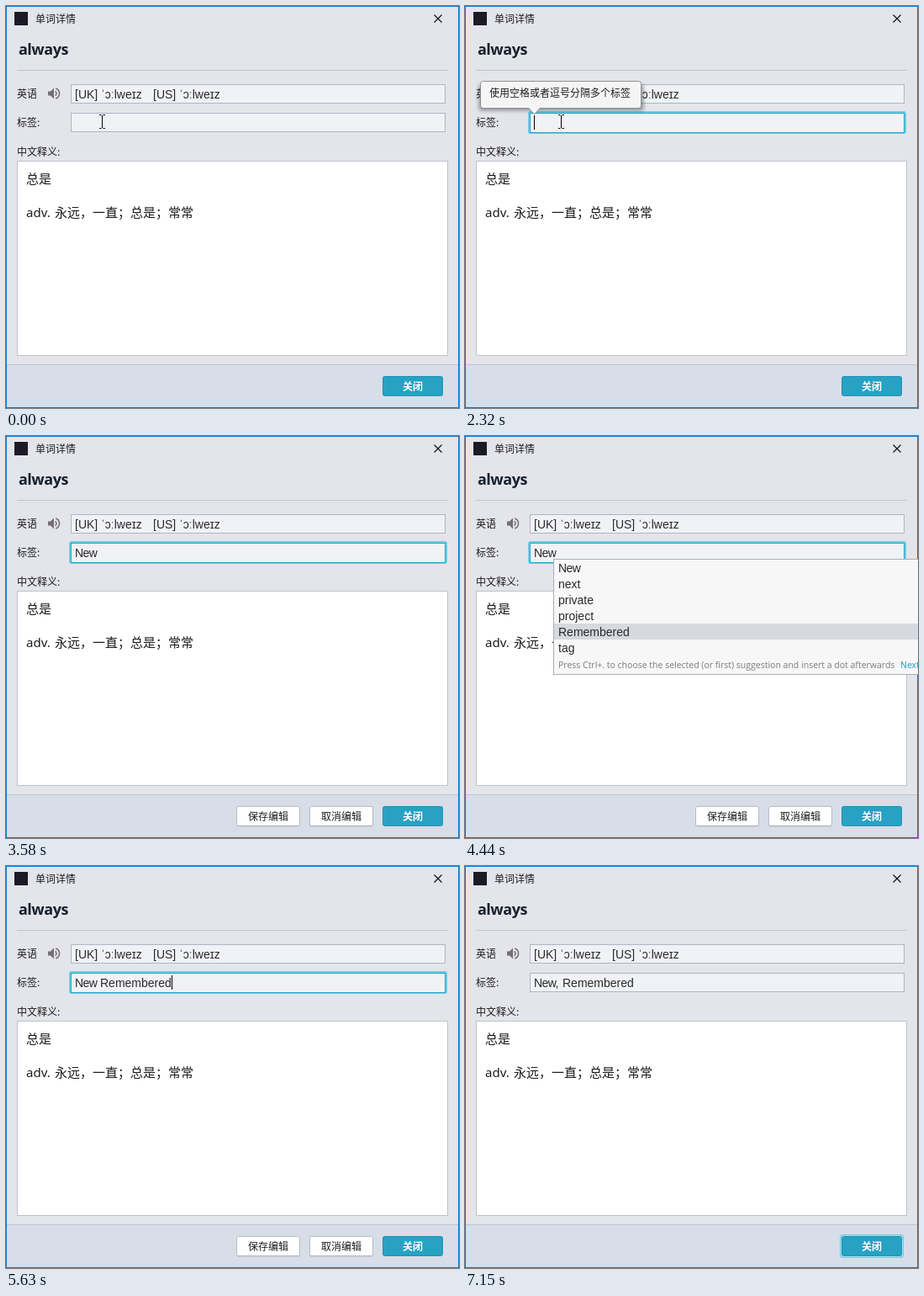
Recreate the animation shown at these times as an HTML page. Size 539 by 478 pixels, loop 7950 ms.

```html
<!DOCTYPE html>
<html lang="zh-CN">
<head>
<meta charset="utf-8">
<title>单词详情</title>
<style>
html, body { margin: 0; width: 100%; height: 100%; overflow: hidden; background: #e4e5eb; }
svg { display: block; }
text { font: 12px "Noto Sans CJK SC", "Noto Sans CJK", "Noto Sans", sans-serif; fill: #1c1c1e; white-space: pre; }
.title { font: 700 18px "Open Sans", "Noto Sans", sans-serif; letter-spacing: -.5px; fill: #17202c; }
.body { font-size: 15px; }
.latin { font: 15px "Noto Sans", sans-serif; }
.field { font: 14px "Liberation Sans", Arial, sans-serif; fill: #2a2a2c; }
.tight { letter-spacing: -.6px; }
.hit { fill: #1f93bd; }
.hint { font: 10.5px "Open Sans", "Noto Sans", sans-serif; fill: #7c7c7c; }
.link { fill: #1f9bbd; }
.primary { font-weight: 700; fill: #fff; }
</style>
</head>
<body>
<svg width="539" height="478" viewBox="0 0 539 478">
  <defs>
    <filter id="soft" x="-10%" y="-30%" width="120%" height="180%">
      <feGaussianBlur stdDeviation="2.6"/>
    </filter>
  </defs>
  <g id="base"></g>
  <g id="live"></g>
</svg>
<script>
const LOOP = 7950;
const TAGS = ["New", "next", "private", "project", "Remembered", "tag"];
const NEW = ["New", 82], REST = 112;

const rect = (x, y, w, h, fill, extra = "") =>
  `<rect x="${x}" y="${y}" width="${w}" height="${h}" fill="${fill}" ${extra}/>`;
const box = (x, y, w, h, fill, stroke, r = 0) =>
  rect(x + .5, y + .5, w - 1, h - 1, fill, `stroke="${stroke}" rx="${r}"`);
const text = (x, y, s, cls = "") => `<text x="${x}" y="${y}" class="${cls}">${s}</text>`;
const path = (d, stroke, width = 1, fill = "none") =>
  `<path d="${d}" fill="${fill}" stroke="${stroke}" stroke-width="${width}"/>`;
const tight = word => word.startsWith("New") ? " tight" : "";

function button(x, w, label, textX, primary, focus) {
  const ring = focus ? rect(x - 2, 438, w + 4, 28, "#6fcbe1", 'rx="4"') +
    box(x - 1, 439, w + 2, 26, "#e9f6fa", "#a9e0ee", 3) : "";
  const face = primary ? box(x, 440, w, 24, "#27a2c4", "#2092b3", 2)
                       : rect(x, 441, w, 24, "#c6ccd6", 'rx="3"') + box(x, 440, w, 24, "#fff", "#b4bac6", 2);
  return ring + face + text(textX, 456.5, label, primary ? "primary" : "");
}

function field(s) {
  let out = s.focus
    ? rect(75, 125, 450, 27, "#6fcbe1", 'rx="3"') + box(77, 127, 446, 24, "#f1f2f6", "#2ba5c6")
    : box(77, 127, 446, 23, "#f1f2f6", "#b0b5c1");
  for (const [word, x] of s.words) out += text(x, 144, word, "field" + tight(word));
  if (s.caret) out += rect(s.caret, 130, 1, 17, "#000");
  return out;
}

function tooltip(opacity) {
  const shape = "M21.5 89.5H206.5Q209.5 89.5 209.5 92.5V118.5Q209.5 121.5 206.5 121.5H89L82.5 129L76 121.5H21.5Q18.5 121.5 18.5 118.5V92.5Q18.5 89.5 21.5 89.5Z";
  return `<g opacity="${opacity}">` +
    rect(17, 94, 195, 30, "#000", 'opacity=".42" filter="url(#soft)"') +
    path(shape, "#8f9094", 1, "#f5f5f6") +
    text(29, 108, "使用空格或者逗号分隔多个标签") + "</g>";
}

function mark(word, query) {
  const at = query ? word.toLowerCase().indexOf(query.toLowerCase()) : -1;
  if (at < 0) return word;
  const end = at + query.length;
  return `${word.slice(0, at)}<tspan class="hit">${word.slice(at, end)}</tspan>${word.slice(end)}`;
}

function popup({ x, items, pick = 0, query = "" }) {
  const rowsEnd = 147 + 19 * items.length;
  let out = box(x, 146, 560 - x, 19 * items.length + 24, "#f7f7f8", "#acadb1") +
    rect(x + 1, 147 + 19 * pick, 540 - x, 19, "#d6d9df");
  items.forEach((word, i) =>
    out += text(x + 6, 162 + 19 * i, mark(word, query), "field" + tight(word)));
  return out +
    text(x + 6, rowsEnd + 15, "Press Ctrl+. to choose the selected (or first) suggestion and insert a dot afterwards", "hint") +
    text(x + 413, rowsEnd + 15, "Next Tip", "hint link");
}

const beam = () => path("M111 129.5H113.5M115.5 129.5H118M114.5 130V145M111 145.5H113.5M115.5 145.5H118", "#000");

// Each step overrides the state left by the one before it.
const steps = [
  [0, { words: [], mouse: true }],
  [1000, { focus: true, caret: 82, tip: .5 }],
  [1070, { tip: 1 }],
  [1860, { caret: 0 }],
  [2320, { caret: 82 }],
  [2390, { tip: 0, mouse: false, edit: true, words: [["N", 82]], caret: 91, list: { x: 75, items: ["New", "next"], query: "N" } }],
  [2590, { words: [["Ne", 82]], caret: 99, list: { x: 75, items: ["New", "next"], query: "Ne" } }],
  [3050, { words: [NEW], caret: 108, list: null }],
  [3580, { caret: 0 }],
  [3710, { caret: 112, list: { x: 105, items: TAGS, pick: 4 } }],
  [4440, { caret: 0 }],
  [4700, { words: [NEW, ["R", REST]], caret: 122, list: { x: 105, items: ["Remembered", "private", "project"], query: "R" } }],
  [4900, { words: [NEW, ["Re", REST]], caret: 130, list: { x: 105, items: ["Remembered"], query: "Re" } }],
  [5630, { words: [NEW, ["Remembered", REST]], caret: 197, list: null }],
  [6090, { caret: 0 }],
  [6490, { words: [["New,", 82], ["Remembered", 116]], focus: false, saving: true }],
  [7150, { edit: false, done: true }]
];
let state = {};
const states = steps.map(([, change]) => state = { ...state, ...change });

const base = document.getElementById("base");
const live = document.getElementById("live");

base.innerHTML =
  rect(0, 0, 539, 478, "#e4e5eb") +
  rect(0, 427, 539, 51, "#d8dee8") + rect(0, 426, 539, 1, "#c0c4cd") +
  rect(10, 7, 16, 16, "#1b1a26") +
  text(35, 20, "单词详情") +
  path("M509.5 10.5L518.5 19.5M518.5 10.5L509.5 19.5", "#111", 1.2) +
  text(15, 58, "always", "title") + rect(13, 76, 513, 1, "#c1c4cd") +
  text(13, 108.5, "英语") +
  path("M50 101.5H53L57 97.5V110.5L53 106.5H50Z", "none", 0, "#756d78") +
  path("M58.7 101.2Q61.2 104 58.7 106.8M59.2 98C65 100 65 108 59.2 110", "#756d78", 1.5) +
  box(77, 93, 446, 23, "#f1f2f6", "#b0b5c1") +
  text(82, 110, "[UK] ˈɔːlweɪz", "field") + text(175, 110, "[US] ˈɔːlweɪz", "field") +
  text(13, 142.5, "标签:") + text(13, 178, "中文释义:") +
  box(13, 184, 513, 232, "#fff", "#bfc3cc") +
  text(24, 211, "总是", "body") +
  text(24, 251, "adv.", "latin") + text(58, 251, "永远，一直；总是；常常", "body") +
  box(0, 0, 539, 478, "none", "#1779c4");

function draw(s) {
  live.innerHTML = field(s) +
    (s.edit ? button(274, 76, "保存编辑", 288, false, s.saving) + button(361, 76, "取消编辑", 375) : "") +
    button(448, 72, "关闭", 472, true, s.done) +
    (s.tip ? tooltip(s.tip) : "") +
    (s.list ? popup(s.list) : "") +
    (s.mouse ? beam() : "");
}

let shown = -1;
const start = performance.now();
function tick(now) {
  const t = Math.max(0, now - start) % LOOP;
  let i = steps.length - 1;
  while (steps[i][0] > t) i--;
  if (i !== shown) draw(states[shown = i]);
  requestAnimationFrame(tick);
}
tick(start);
</script>
</body>
</html>
```
